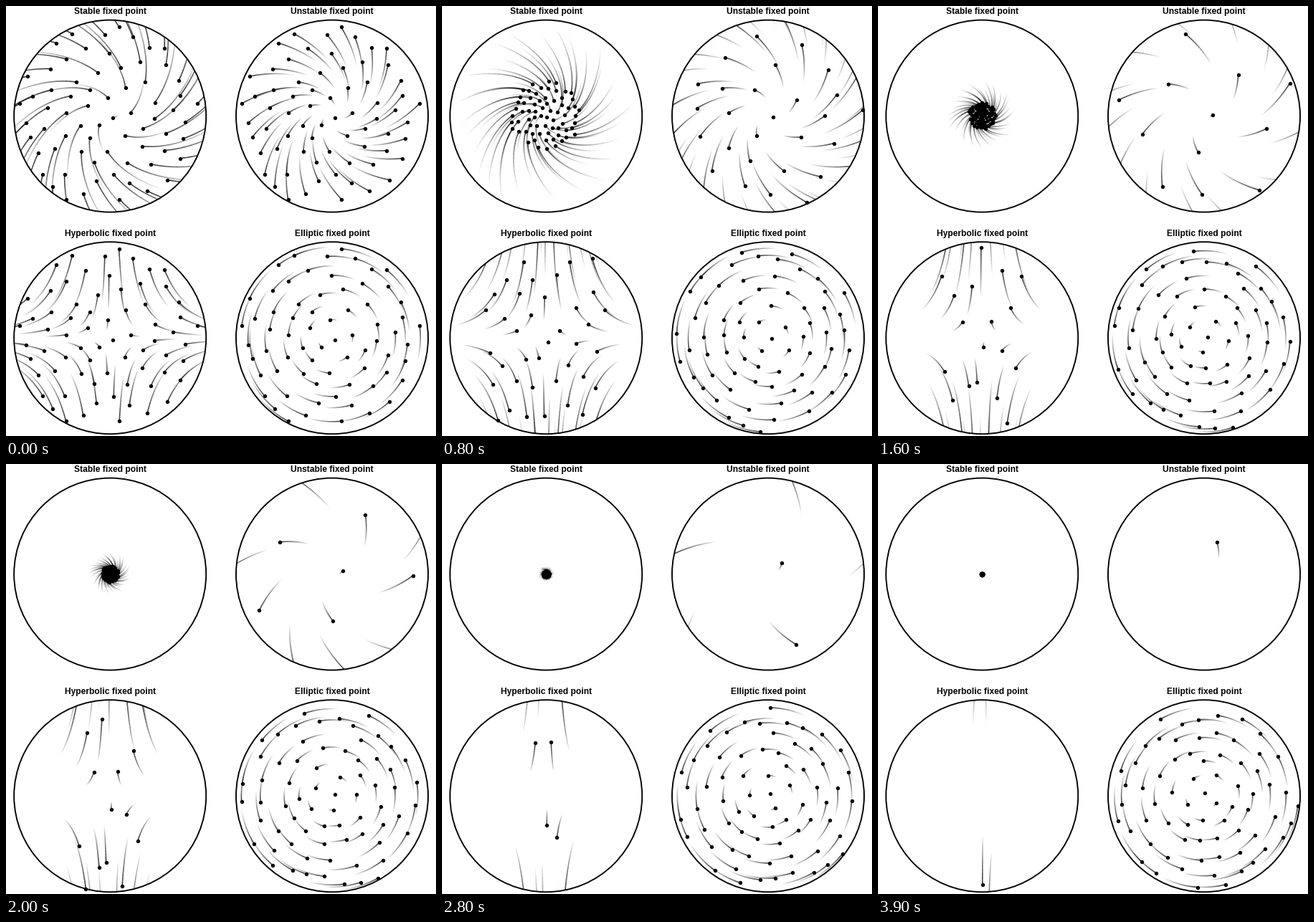
A matplotlib script that plays this animation: 600x600 px, repeating every 4 s.

```python
import numpy as np
import matplotlib.pyplot as plt
from matplotlib.animation import FuncAnimation
from matplotlib.collections import LineCollection
from matplotlib.patches import Circle

SIZE, DPI = 600, 100
PX = 72 / DPI           # points per pixel
FRAMES, INTERVAL = 40, 100
DT = 0.05               # flow time per frame
RADIUS = 134
TRAIL_TIME, TRAIL_STEPS = 8 * DT, 16
TRAIL_ALPHA = 0.8

# Starting points as pixel offsets from the centre, y pointing down
POINTS = np.array([
    (12.5, -124.5), (31.5, -111), (-53, -115), (-75, -102), (55, -96),
    (76, -95), (-1.5, -87.5), (-61, -79.5), (78, -72), (15, -68),
    (42, -76), (-83, -66), (-115, -55.5), (96, -50), (-17, -60.5),
    (49, -47.5), (-47, -47.5), (21.5, -39.5), (-82, -36.5), (-28.5, -36.5),
    (-108, -27.5), (-55, -28), (-3, -25.5), (62.5, -19), (122, -17.5),
    (-126, -17.5), (-31, -14.5), (98, -29), (28.3, -4.6), (88, -8.5),
    (-61, -4.5), (-87, -12), (3.9, 2.5), (62, 3.5), (105, 8.5),
    (-117, 9.5), (-41.5, 13.5), (-15.2, 12.5), (46, 17), (-92, 17.5),
    (-111, 29), (-62, 27), (20.5, 27), (78, 24), (102, 31.5),
    (-28.4, 30.7), (-4, 49), (45, 42), (97.5, 59), (-77, 45.5),
    (-40, 49.5), (24, 65), (-22, 64), (75.5, 48), (57, 67),
    (80, 89), (52, 104.5), (27, 93.5), (13, 116), (5, 81.5),
    (-19, 90.5), (-37.5, 108), (-63.5, 81), (-61.5, 116), (-80, 98.5),
    (-94, 81), (-100, 51.5), (-7.4, -113.8), (-34.5, -94.5),
])
START = POINTS[:, 0] - 1j * POINTS[:, 1]


def spiral(rate):
    return lambda t: START * np.exp(rate * t)


def saddle(t):
    return START.real * np.exp(-t) + 1j * START.imag * np.exp(2 * t)


def to_xy(z):
    return np.stack([z.real, z.imag], axis=-1)


class Panel:
    def __init__(self, ax, title, cx, cy, flow):
        self.flow = flow
        self.centre = np.array([cx, SIZE - cy])
        ax.text(cx, SIZE - (cy - 142.2), title, ha="center", va="baseline",
                family="Liberation Sans", weight="bold", size=12 * PX)

        clip = Circle(self.centre, RADIUS, transform=ax.transData)
        fade = TRAIL_ALPHA * (1 - (np.arange(TRAIL_STEPS) + 0.5) / TRAIL_STEPS)
        shades = np.zeros((TRAIL_STEPS, 4))
        shades[:, 3] = fade
        self.trails = LineCollection([], colors=np.repeat(shades, len(START), axis=0),
                                     linewidths=1.6 * PX, capstyle="butt", zorder=1)
        ax.add_collection(self.trails)
        self.trails.set_clip_path(clip)

        ax.add_patch(Circle(self.centre, RADIUS, fill=False, ec="black",
                            lw=1.9 * PX, zorder=2))
        self.dots = ax.scatter([], [], s=(5.4 * PX) ** 2, c="black",
                               linewidths=0, zorder=3)

    def draw(self, t):
        times = t - np.linspace(0, TRAIL_TIME, TRAIL_STEPS + 1)
        path = to_xy(np.array([self.flow(s) for s in times])) + self.centre
        segments = np.stack([path[:-1], path[1:]], axis=2)
        self.trails.set_segments(segments.reshape(-1, 2, 2))

        now = self.flow(t)
        inside = np.abs(now) <= RADIUS
        self.dots.set_offsets(to_xy(now[inside]) + self.centre)


fig = plt.figure(figsize=(SIZE / DPI, SIZE / DPI), dpi=DPI, facecolor="white")
ax = fig.add_axes([0, 0, 1, 1])
ax.set_xlim(0, SIZE)
ax.set_ylim(0, SIZE)
ax.axis("off")

panels = [
    Panel(ax, "Stable fixed point", 145.2, 153.6, spiral(-2.4 - 1.8j)),
    Panel(ax, "Unstable fixed point", 455, 153.6, spiral(1.2 + 0.9j)),
    Panel(ax, "Hyperbolic fixed point", 145.2, 463.2, saddle),
    Panel(ax, "Elliptic fixed point", 455, 463.2, spiral(1j)),
]


def update(frame):
    for panel in panels:
        panel.draw(frame * DT)
    return []


anim = FuncAnimation(fig, update, frames=FRAMES, interval=INTERVAL,
                     repeat=True, repeat_delay=0, blit=False)
plt.show()
```
